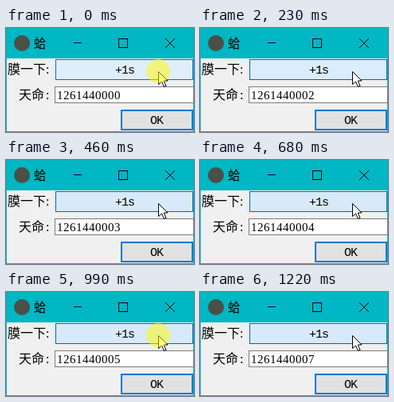
Write an HTML page with a canvas that moves like this. It is 236 by 130 pixels and loops after 1.3 s.

```html
<!DOCTYPE html>
<html lang="zh">
<head>
<meta charset="utf-8">
<style>
  html, body { margin: 0; width: 236px; height: 130px; overflow: hidden; }
  canvas { display: block; }
</style>
</head>
<body>
<canvas id="stage" width="236" height="130"></canvas>
<script>
const ctx = document.getElementById('stage').getContext('2d');
const LOOP = 1300;
const START = 1261440000;
// The mouse is held down during each of these spans; releasing it adds one.
const CLICKS = [[0, 80], [160, 230], [380, 460], [600, 680], [830, 910], [990, 1070], [1150, 1220]];
const SERIF = '"Liberation Serif", serif';
const MONO = '15px "Liberation Mono", monospace';
const CJK = '"Noto Sans CJK SC", "Noto Sans CJK", sans-serif';

function rect(x, y, w, h, color) {
  ctx.fillStyle = color;
  ctx.fillRect(x, y, w, h);
}

function box(x, y, w, h, fill, border, line) {
  rect(x, y, w, h, border);
  rect(x + line, y + line, w - 2 * line, h - 2 * line, fill);
}

function text(str, x, y, font, spacing = 0) {
  ctx.font = font;
  ctx.letterSpacing = spacing + 'px';
  ctx.fillStyle = '#000';
  ctx.fillText(str, x, y);
}

function label(str, x, y) {
  text(str, x, y, '300 16px ' + CJK);
  text(':', 50, y, '16px ' + SERIF);
}

function trace(points) {
  ctx.beginPath();
  points.forEach(([x, y]) => ctx.lineTo(x, y));
}

function disc(x, y, r, color) {
  ctx.fillStyle = color;
  ctx.beginPath();
  ctx.arc(x, y, r, 0, 2 * Math.PI);
  ctx.fill();
}

function titleBar() {
  rect(0, 0, 236, 38, '#00b7c3');
  disc(20, 19, 10, '#4a4f48');
  text('蛤', 35, 25, '15.5px ' + CJK);
  rect(85, 18, 10, 1, '#000');
  ctx.strokeStyle = '#000';
  ctx.lineWidth = 1;
  ctx.strokeRect(141.5, 13.5, 11, 11);
  ctx.beginPath();
  ctx.moveTo(200, 13);
  ctx.lineTo(212, 25);
  ctx.moveTo(212, 13);
  ctx.lineTo(200, 25);
  ctx.stroke();
}

function pointer(x, y) {
  ctx.save();
  ctx.translate(x + 0.5, y + 0.5);
  trace([[0, 0], [0, 16], [4, 12.5], [7, 19], [9.5, 18], [6.7, 11.5], [11.5, 11.5]]);
  ctx.closePath();
  ctx.fillStyle = '#fff';
  ctx.fill();
  ctx.strokeStyle = '#000';
  ctx.lineWidth = 1;
  ctx.stroke();
  ctx.restore();
}

function draw(t) {
  const held = CLICKS.some(([down, up]) => t >= down && t < up);
  const count = CLICKS.filter(([, up]) => t >= up).length;
  const shade = t < 80 ? '#e0eefa' : t < 460 ? '#dbecfa' : '#d8eaf9';
  const edge = t < 80 ? '#0072cb' : '#0066b8';

  rect(0, 0, 236, 130, '#00b7c3');
  rect(1, 38, 234, 91, '#f0f0f0');
  titleBar();

  label('膜一下', 2, 57);
  label('天命', 16, 89);

  box(62, 39, 173, 26, shade, edge, 1);
  text('+1s', 137, 57, MONO, -1);

  box(61, 73, 175, 21, '#fff', '#7a7a7a', 1);
  text(String(START + count), 64, 89, '15px ' + SERIF, 0.5);

  box(144, 102, 91, 26, '#e1e1e1', '#0078d7', 2);
  text('OK', 181, 120, MONO, -1);

  pointer(191, 54);
  if (held) disc(191, 54, 15, 'rgba(255, 250, 0, 0.5)');
}

function tick() {
  draw(performance.now() % LOOP);
  requestAnimationFrame(tick);
}
tick();
</script>
</body>
</html>
```
